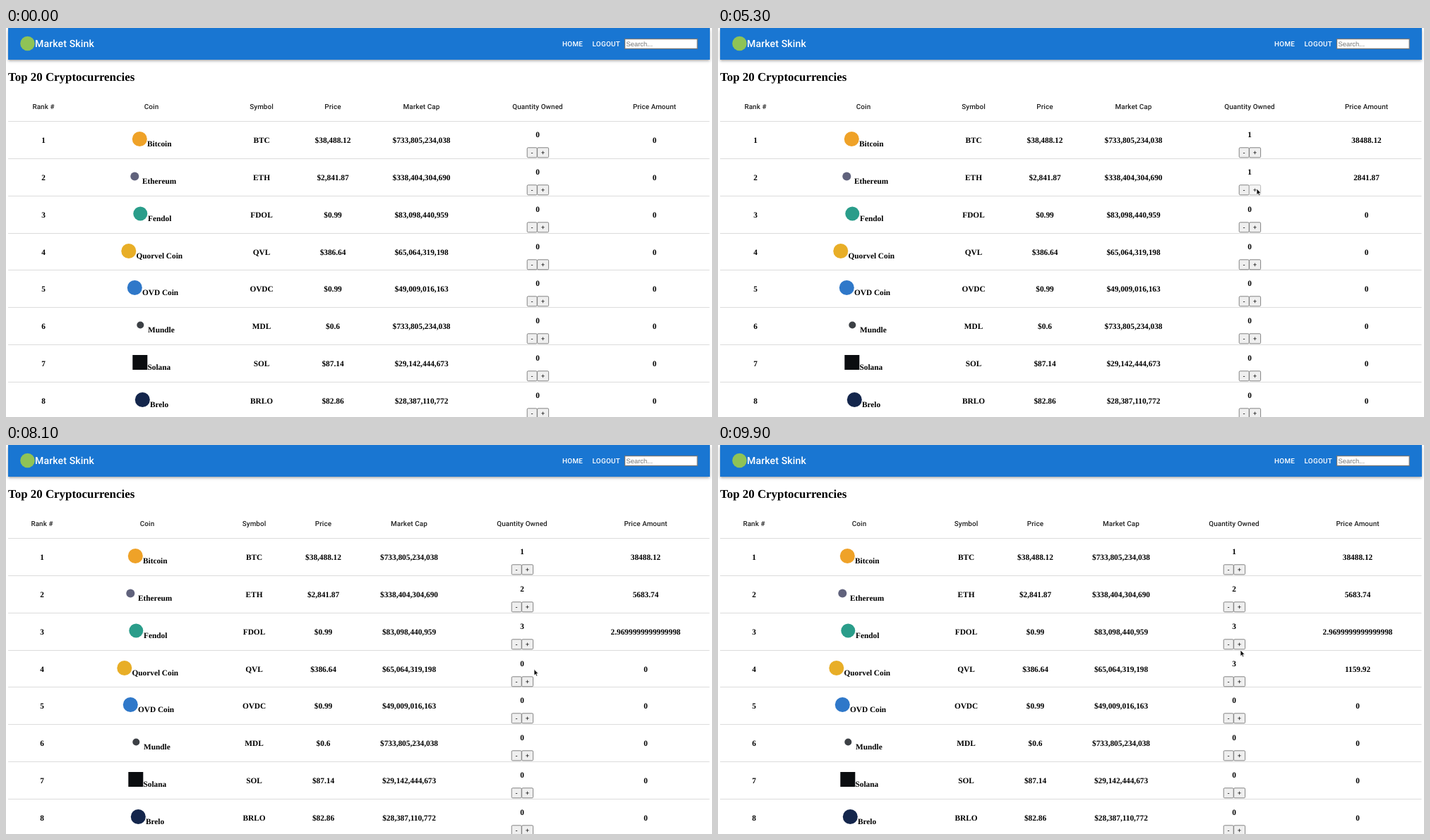
Write an HTML page that moves like this. It is 1000 by 552 pixels and loops after 10 s.

```html
<!DOCTYPE html>
<html lang="en">
<head>
<meta charset="utf-8">
<title>Top 20 Cryptocurrencies</title>
<style>
  html, body { margin: 0; width: 100%; height: 100%; overflow: hidden; background: #fff; }
  svg { position: absolute; inset: 0; width: 100%; height: 100%; }
  text { font: bold 11.3px "Liberation Serif", "Times New Roman", serif; white-space: pre; text-rendering: geometricPrecision; }
  .title { font-size: 16.9px; }
  .mid { text-anchor: middle; }
  .head { font: 500 9.87px Roboto, sans-serif; letter-spacing: .0107em; fill: #212121; }
  .brand { font: 500 14.1px Roboto, sans-serif; letter-spacing: .0075em; fill: #fff; }
  .nav { font: 500 9.87px Roboto, sans-serif; letter-spacing: .0286em; fill: #fff; }
  .hint { font: 9.4px "Liberation Sans", Arial, sans-serif; fill: #757575; }
  .sign { font: 9.4px "Liberation Sans", Arial, sans-serif; fill: #000; }
  .bar {
    position: absolute; left: 3px; top: 0; width: 993.5px; height: 45px; background: #1976d2;
    box-shadow: 0 1.4px 2.8px -.7px rgba(0, 0, 0, .2), 0 2.8px 3.5px rgba(0, 0, 0, .14), 0 .7px 7px rgba(0, 0, 0, .12);
  }
  .line { stroke: #dcdcdc; stroke-width: 1; }
  .search { fill: #fff; stroke: #767676; stroke-width: 1.2; }
  .button { fill: #efefef; stroke: #767676; stroke-width: .9; }
  .button.hover { fill: #dfdfdf; stroke: #4f4f4f; }
  .button.pressed { fill: #f5f5f5; stroke: #b4b4b4; }
</style>
</head>
<body>
<div class="bar"></div>
<svg id="stage" viewBox="0 0 1000 552" preserveAspectRatio="none"></svg>
<script>
const LOOP = 10000, STEP = 100, ROW_TOP = 132.5, ROW_HEIGHT = 52.86;
const NARROW = [53, 206, 362, 463, 588.5, 753, 918.5];
const WIDE = [51, 200, 351.5, 449.5, 571, 731, 906];
const HEADINGS = ["Rank #", "Coin", "Symbol", "Price", "Market Cap", "Quantity Owned", "Price Amount"];

// name, name offset from the column centre, symbol, price, market cap, icon colour, icon radius
const COINS = [
  ["Bitcoin", -6, "BTC", 38488.12, "733,805,234,038", "#efa228", 10.5],
  ["Ethereum", -13, "ETH", 2841.87, "338,404,304,690", "#60627c", 6],
  ["Fendol", -5, "FDOL", 0.99, "83,098,440,959", "#2a9d8a", 10],
  ["Quorvel Coin", -21.5, "QVL", 386.64, "65,064,319,198", "#e8ae27", 10.5],
  ["OVD Coin", -13, "OVDC", 0.99, "49,009,016,163", "#2f78c9", 10.5],
  ["Mundle", -5, "MDL", 0.6, "733,805,234,038", "#3c4045", 5],
  ["Solana", -5.5, "SOL", 87.14, "29,142,444,673", "#0b0d10", 10.5],
  ["Brelo", -2, "BRLO", 82.86, "28,387,110,772", "#14264c", 10.5]
];
const SQUARE_ICON = 6;

// [time, row]
const CLICKS = [[2600, 0], [4300, 1], [5400, 1], [6600, 2], [7000, 2], [7400, 2], [8700, 3], [9000, 3], [9400, 3]];
// [from, to, row]
const PRESSES = [[2500, 2600, 0], [5300, 5400, 1], [7200, 7400, 2], [8900, 9000, 3], [9200, 9400, 3]];
// [time, x, y]
const PATH = [
  [500, 790, 552], [1300, 762, 177], [3200, 762, 177], [3300, 763, 184.8], [3800, 763, 228],
  [5900, 763, 228], [6400, 760.5, 279.5], [7600, 761, 280], [8400, 742, 336], [9600, 742, 336], [9900, 740, 291]
];

const stage = document.getElementById("stage");

function add(parent, tag, attrs = {}, content = "") {
  const node = document.createElementNS("http://www.w3.org/2000/svg", tag);
  for (const key in attrs) node.setAttribute(key, attrs[key]);
  node.textContent = content;
  parent.append(node);
  return node;
}

const label = (parent, x, y, content, cls = "mid") => add(parent, "text", { x, y, class: cls }, content);
const box = (parent, x, y, width, height, attrs) => add(parent, "rect", { x, y, width, height, ...attrs });

function drawHeader() {
  add(stage, "circle", { cx: 30.5, cy: 22, r: 10.3, fill: "#8fc356" });
  label(stage, 41, 27.2, "Market Skink", "brand");
  label(stage, 788, 26, "HOME", "nav");
  label(stage, 830.5, 26, "LOGOUT", "nav");
  box(stage, 876.6, 15.6, 102.6, 13.8, { class: "search" });
  label(stage, 878.5, 25.8, "Search...", "hint");
  label(stage, 3, 74.5, "Top 20 Cryptocurrencies", "title");
}

function drawRow(columns, coin, i) {
  const [name, offset, symbol, price, cap, color, r] = coin;
  const y = Math.round(159 + i * ROW_HEIGHT);
  const [rank, coinCol, symbolCol, priceCol, capCol, quantityCol, amountCol] = columns;
  const cx = offset - 10.7, cy = y - 1.5;

  label(rank, 0, y + 4, i + 1);
  if (i === SQUARE_ICON) box(coinCol, cx - r, cy - r, 2 * r, 2 * r, { fill: color });
  else add(coinCol, "circle", { cx, cy, r, fill: color });
  label(coinCol, offset, y + 9.3, name, "");
  label(symbolCol, 0, y + 4, symbol);
  label(priceCol, 0, y + 4, "$" + price.toLocaleString("en-US"));
  label(capCol, 0, y + 4, "$" + cap);

  const quantity = label(quantityCol, 0, y - 3.7, 0);
  box(quantityCol, -14.8, y + 10.8, 14, 14, { rx: 1.4, class: "button" });
  const plus = box(quantityCol, -.4, y + 10.8, 16, 14, { rx: 1.4, class: "button" });
  label(quantityCol, -8, y + 21, "-", "sign mid");
  label(quantityCol, 7.5, y + 21, "+", "sign mid");
  const amount = label(amountCol, 0, y + 4, 0);
  return { price, y, quantity, plus, amount };
}

function drawTable() {
  for (let i = 0; i < 8; i++) {
    const y = Math.floor(ROW_TOP + i * ROW_HEIGHT) + .5;
    add(stage, "line", { x1: 3, x2: 996.5, y1: y, y2: y, class: "line" });
  }
  const columns = HEADINGS.map(heading => {
    const column = add(stage, "g");
    label(column, 0, 115.3, heading, "head mid");
    return column;
  });
  return { columns, rows: COINS.map((coin, i) => drawRow(columns, coin, i)) };
}

function cursorAt(t) {
  if (t < PATH[0][0]) return null;
  const next = PATH.findIndex(point => point[0] > t);
  if (next < 0) return PATH[PATH.length - 1].slice(1);
  const [t0, x0, y0] = PATH[next - 1], [t1, x1, y1] = PATH[next];
  const p = (t - t0) / (t1 - t0), eased = p * p * (3 - 2 * p);
  return [x0 + (x1 - x0) * eased, y0 + (y1 - y0) * eased];
}

drawHeader();
const { columns, rows } = drawTable();
const pointer = add(stage, "path", {
  d: "M0 0V8.6L2 6.9 3.3 9.8 4.8 9.1 3.5 6.3H6.1Z", fill: "#111", stroke: "#fff", "stroke-width": .7
});

function render(time) {
  const t = Math.floor(time % LOOP / STEP) * STEP;
  const counts = rows.map((_, i) => CLICKS.filter(([at, row]) => row === i && at <= t).length);
  const centres = counts[2] === 3 ? WIDE : NARROW;
  columns.forEach((column, i) => column.setAttribute("transform", `translate(${centres[i]} 0)`));

  const cursor = cursorAt(t);
  pointer.style.display = cursor ? "" : "none";
  if (cursor) pointer.setAttribute("transform", `translate(${cursor})`);

  rows.forEach(({ price, y, quantity, plus, amount }, i) => {
    quantity.textContent = counts[i];
    amount.textContent = price * counts[i];
    const dx = cursor ? cursor[0] - centres[5] : -1;
    const dy = cursor ? cursor[1] - y : -1;
    const hover = dx >= 0 && dx <= 16 && dy >= 10.5 && dy <= 25;
    const pressed = PRESSES.some(([from, to, row]) => row === i && t >= from && t < to);
    plus.setAttribute("class", "button" + (pressed ? " pressed" : hover ? " hover" : ""));
  });
}

const start = performance.now();
function tick() {
  render(performance.now() - start);
  requestAnimationFrame(tick);
}
tick();
</script>
</body>
</html>
```
